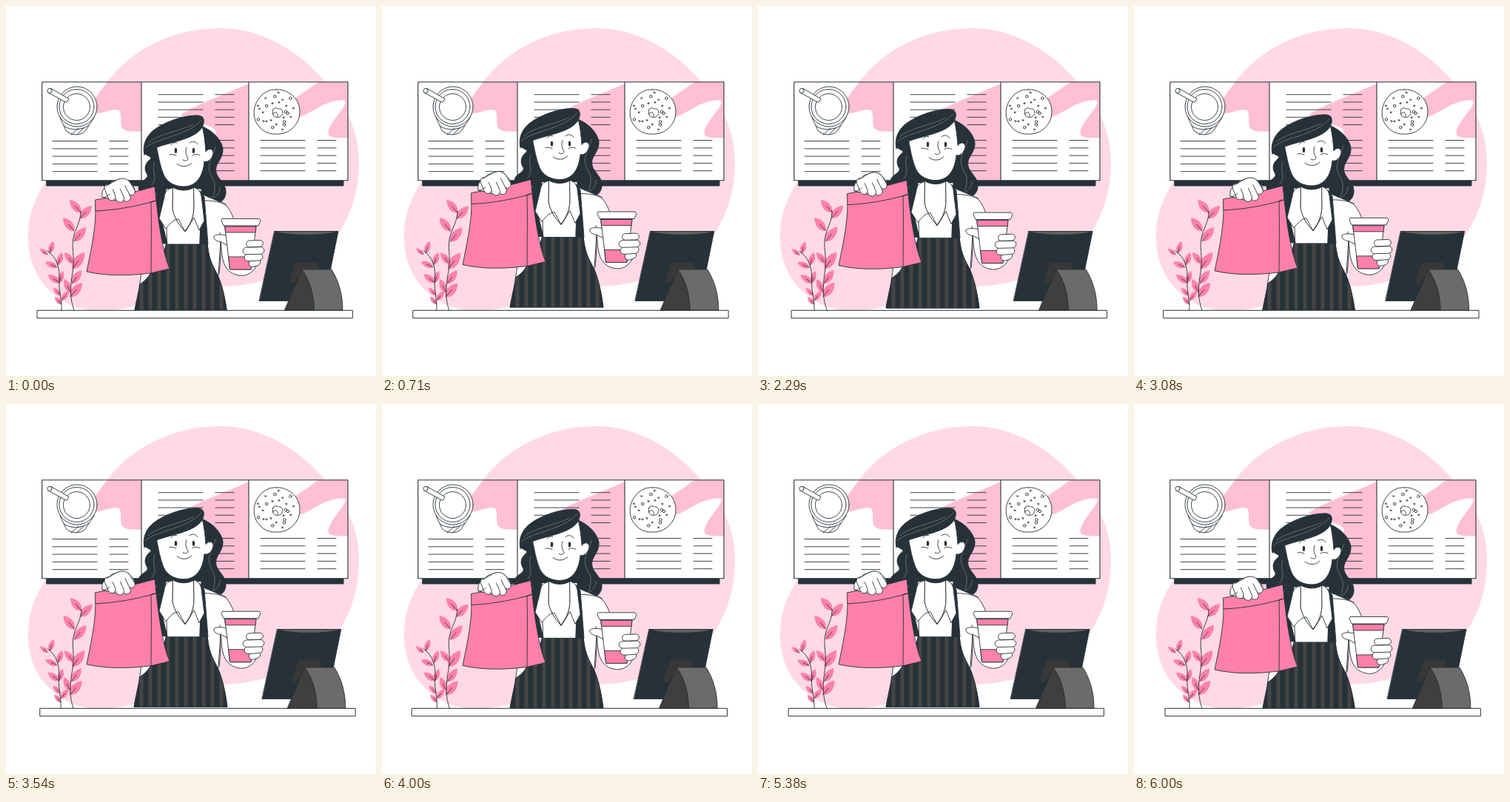
Animation of 500 by 500 pixels, one loop 6040 ms. Source, as an HTML page with a canvas:

```html
<!DOCTYPE html>
<html lang="en">
<head>
<meta charset="utf-8">
<title>Coffee counter</title>
<style>
html, body { margin: 0; width: 100%; height: 100%; overflow: hidden; background: #fff; }
canvas { display: block; width: 500px; height: 500px; }
</style>
</head>
<body>
<canvas id="stage"></canvas>
<script>
const LOOP = 6040, LEAD = 40;
const INK = '#263238', PINK = '#ff80ab', MID = '#ffbfd5', PALE = '#ffd9e6', WHITE = '#fff';
const canvas = document.getElementById('stage');
const ctx = canvas.getContext('2d');
const dpr = window.devicePixelRatio || 1;
canvas.width = canvas.height = 500 * dpr;

function shape(d, fill, stroke = INK, width = 0.9) {
  const p = new Path2D(d);
  if (fill) { ctx.fillStyle = fill; ctx.fill(p); }
  if (stroke) { ctx.strokeStyle = stroke; ctx.lineWidth = width; ctx.stroke(p); }
}
const line = (d, color = INK, width = 0.9) => shape(d, null, color, width);

function oval(x, y, rx, ry = rx, fill = WHITE, stroke = INK) {
  ctx.beginPath();
  ctx.ellipse(x, y, rx, ry, 0, 0, Math.PI * 2);
  if (fill) { ctx.fillStyle = fill; ctx.fill(); }
  if (stroke) { ctx.strokeStyle = stroke; ctx.lineWidth = 0.9; ctx.stroke(); }
}

// Rounded finger between two points
function finger(x1, y1, x2, y2, w) {
  const a = Math.atan2(y2 - y1, x2 - x1), r = w / 2;
  ctx.beginPath();
  ctx.arc(x1, y1, r, a + Math.PI / 2, a - Math.PI / 2);
  ctx.arc(x2, y2, r, a - Math.PI / 2, a + Math.PI / 2);
  ctx.closePath();
  ctx.fillStyle = WHITE; ctx.fill();
  ctx.strokeStyle = INK; ctx.lineWidth = 0.9; ctx.stroke();
}

function rows(x, y, w, n, step) {
  for (let i = 0; i < n; i++) line(`M${x} ${y + i * step}h${w}`);
}

// Pointed leaf from its base to its tip
function leaf(x, y, tx, ty) {
  const dx = tx - x, dy = ty - y, k = 0.3;
  const at = (f, s) => `${x + dx * f - s * dy * k} ${y + dy * f + s * dx * k}`;
  shape(`M${x} ${y}C${at(.2, 1)} ${at(.65, 1)} ${tx} ${ty}C${at(.65, -1)} ${at(.2, -1)} ${x} ${y}Z`, PINK, null);
  line(`M${x} ${y}L${x + dx * .5} ${y + dy * .5}`, INK, 0.8);
}

function backdrop() {
  shape('M290 30C345 30 395 60 432 103C462 138 477 170 477 212C477 255 462 300 432 328C405 354 360 372 312 378C260 380 225 388 185 401C160 412 120 416 92 406C50 388 28 352 30 308C30 275 45 250 65 218C100 165 112 130 140 98C175 55 230 30 290 30Z', PALE, null);
}

function board() {
  shape('M55 236H456V243H55Z', INK);
  shape('M48.7 102.8H462V235.8H48.7Z', WHITE, null);
  shape('M183 103H137C129 112 122 122 118 130V146C131 145 142 139 151 140C159 144 152 159 158 166C164 171 174 169 183 170Z', MID, null);
  shape('M328 105C290 122 260 132 236 147C255 160 283 160 284 171C283 180 270 180 265 195C262 215 280 236 290 236H328Z', MID, null);
  shape('M422 103L386 128L397 150C413 144 421 136 438 130C449 127 457 126 459 129C459 136 446 148 438 163C434 171 435 176 440 177C447 179 455 178 462 178V103Z', MID, null);
  line('M48.7 102.8H462V235.8H48.7Z M183 103V236M328 103V236', INK, 1.1);

  rows(63, 182.5, 60, 5, 10.3);
  rows(140, 182.5, 25, 5, 10.3);
  rows(206, 119.7, 60, 5, 10.2);
  rows(283, 119.7, 25, 5, 10.2);
  rows(283, 181.5, 25, 5, 10.3);
  rows(344, 181.5, 60, 5, 10.3);
  rows(421, 181.5, 25, 5, 10.3);

  // Iced drink
  shape('M73 151L81 168C86 175 101 176 107 169L119 151Z', WHITE);
  line('M78 162C88 169 103 168 112 161M88 174L98 165M96 174L106 164');
  oval(96, 136, 27);
  oval(95.5, 136, 23.5);
  oval(95.5, 136.5, 18);
  shape('M61 111.5L85 125.5L82 130.5L57 117Z', WHITE);
  oval(59, 114.5, 3.1);

  // Donut
  shape('M366 113C375 112 386 118 392 126C399 136 398 150 393 158C387 168 376 174 365 173C354 174 343 167 338 157C333 147 335 134 341 126C347 117 356 112 366 113Z', WHITE);
  shape('M361 140C364 135 368 140 371 139C376 142 374 149 369 150C364 152 358 148 361 140Z', WHITE);
  line('M361 146C364 141 368 144 367 149');
  for (let i = 0; i < 26; i++) {
    const r = 12 + (i * 7 % 16), a = i * 2.4;
    oval(366 + r * Math.cos(a), 143 + r * Math.sin(a), i % 3 ? 1 : 1.8);
  }
}

function plants() {
  [[101, 279, 86, 262], [100, 287, 116, 270], [92, 304, 77, 286], [92, 318, 108, 299],
   [91, 348, 79, 333], [90, 355, 106, 333], [89, 375, 102, 357],
   [87, 387, 79, 369], [87, 393, 103, 374],
   [56, 336, 46, 328], [59, 334, 64, 318], [69, 353, 53, 346], [70, 350, 76, 333],
   [72, 374, 57, 363], [72, 374, 77, 358], [74, 391, 64, 381], [75, 398, 85, 385],
   [75, 403, 66, 393]].forEach(l => leaf(...l));
  line('M92 411C87 397 86 382 90 360C94 338 87 325 92 309C96 296 101 290 101 277');
  line('M75 412C76 397 71 386 72 370C73 354 69 340 56 331');
}

function person() {
  // Hair behind the shoulders
  shape('M187 199C192 204 198 203 195 207C186 214 187 222 191 228C193 235 179 236 179 246C180 255 194 263 210 263L280 267C296 268 301 252 294 241C289 233 282 228 284 218C286 210 294 204 293 192C290 180 281 170 266 163L215 170Z', INK);
  line('M283 190C279 207 269 214 278 231C285 241 282 253 279 259M201 211C196 224 206 231 197 242M289 245C290 252 284 258 279 261', '#7b8589', 0.7);

  // Body
  shape('M207 248C190 260 187 300 183 360L180 380L285 390L290 320L297 268L266 255Z', WHITE);
  // Arm with cup
  shape('M269 263C280 263 293 265 298 270C306 280 309 290 312 306L338 352C333 361 324 366 314 364C299 361 292 350 291 327L289 306', WHITE);
  line('M290 310C290 330 290 345 288 362');

  // Apron
  const apron = 'M217 321H272C274 339 277 347 283 358C292 374 296 395 299 416.5H173C176 400 179 388 181 376C189 371 195 364 197 357L211 340Z';
  shape(apron, INK);
  ctx.save();
  ctx.clip(new Path2D(apron));
  ctx.fillStyle = '#454545';
  for (let x = 180.5; x < 302; x += 12) ctx.fillRect(x, 321, 5, 98);
  ctx.restore();
  line(apron);

  // Shirt, straps and collar
  shape('M216 247H264L262 322H218Z', WHITE);
  shape('M204 247H216L209 284L218 321H212L201 270Z', INK);
  shape('M262 250L268 258L273 322H262L263 290Z', INK);
  shape('M225 238V275C227 287 235 297 242 304C248 297 253 287 254 275V238Z', WHITE);
  shape('M225 246C218 247 215 251 214 258L207 287L216 301C222 293 228 288 233 288L242 305C234 296 227 286 225 274Z', WHITE);
  shape('M254 245C260 247 263 251 264 257L268 290L261 303L254 286L242 305C249 296 253 287 254 274Z', WHITE);

  // Head
  shape('M212 218C212 240 227 249 240 249C255 249 270 238 271 211Z', INK);
  shape('M203 188C206 202 208 216 213 228C218 239 229 244 240 244C256 244 266 232 268 210C274 212 279 205 280 199C280 192 273 192 270 197C269 181 267 170 265 162L220 174Z', WHITE);
  shape('M187 201C184 189 189 177 198 169C214 156 240 148 256 148C267 147 270 154 265 164C255 181 219 184 202 192C195 195 190 198 187 201Z', INK);
  line('M188 192C200 179 246 176 264 154M192 185C203 174 235 169 253 160', '#7b8589', 0.7);
  oval(229.5, 195.5, 1.7, 3.6, INK, null);
  oval(253.5, 195.5, 1.7, 3.6, INK, null);
  line('M223 188C225 185 228 184 231 185M248 185C252 182 257 183 259 187M244 191C242 197 243 201 246 206C246 209 242 210 239 208');
  line('M231 213C236 218 246 218 251 212M221 201C224 200 227 201 230 202M252 202C256 200 259 200 262 202');

  // Bag
  shape('M121 277C121 303 114 335 109 359C139 366 170 364 196 361L221 355C211 331 206 290 203 263L196 265Z', PINK);
  shape('M121 262C147 258 176 251 201 244L203 263C176 271 148 276 121 277Z', PINK);
  line('M196 265C197 298 196 330 196 361M200 263L196 265');

  // Hand on the bag
  shape('M130 258C128 248 135 243 144 238C153 232 161 232 167 238C173 243 176 250 173 252L150 263Z', WHITE);
  finger(163, 240, 169.5, 251, 9.5);
  finger(154, 241, 163, 259, 10.5);
  finger(146, 242, 154, 260, 11);
  finger(138, 246, 143, 258, 10);
  shape('M148 236C155 232 162 232 166 237L156 247L140 248L136 243Z', WHITE, null);
  line('M136 243L148 236C155 232 162 232 166 237M130 258C132 260 136 258 140 254');

  // Cup and hand
  shape('M300 310C292 309 285 308 281 311C280 315 284 318 291 319L302 325Z', WHITE);
  shape('M296 297H338L331 356H303Z', WHITE);
  shape('M296 298H338L337 306H297Z', PINK);
  shape('M301 339H333L331 356H303Z', PINK);
  shape('M292.5 287.5H342L344 290L341 297H294L291 290Z', WHITE);
  finger(333, 348, 339, 346, 9.5);
  finger(327, 340, 342, 339, 9.8);
  finger(325, 331, 344, 330.5, 9.6);
  finger(329, 321.5, 343, 321, 8.8);
}

function counter() {
  shape('M42.4 411.3H468.4V421.8H42.4Z', WHITE, INK, 1);
  shape('M363 304.5H449L430 398.5H342.5Z', INK);
  shape('M363 304.5H449C430 311 382 311 363 304.5Z', '#616161');
  shape('M391 346H421L424 357H402L388 377L382 374Z', '#383838');
  shape('M376.5 411L400 356C411 371 416 390 416.5 411Z', '#3f3f3f');
  shape('M400 356H440C450 372 455 390 455 411H416.5C416 390 411 371 400 356Z', '#6b6b6b');
}

// Piecewise linear value through [phase, value] stops
function track(stops, p) {
  let i = 1;
  while (i < stops.length - 1 && p > stops[i][0]) i++;
  const [a, u] = stops[i - 1], [b, v] = stops[i];
  return u + (v - u) * (p - a) / (b - a);
}
const SHAKE = [0, -1, 2, -4, 4, -4, 4, -4, 2, -1, 0].map((v, i) => [i / 10, v]);
const WIND = [[0, 0], [.25, 1], [.75, -1], [1, 0]];
const FLOAT = [[0, 0], [.5, -10], [1, 0]];
const phase = (t, period) => (t % period) / period;

function moved(dx, dy, paint) {
  ctx.save();
  ctx.translate(dx, dy);
  paint();
  ctx.restore();
}

function draw(ms) {
  const t = ms % LOOP + LEAD;
  ctx.setTransform(dpr, 0, 0, dpr, 0, 0);
  ctx.lineJoin = ctx.lineCap = 'round';
  ctx.fillStyle = WHITE;
  ctx.fillRect(0, 0, 500, 500);
  backdrop();
  board();

  ctx.save();
  ctx.translate(81, 337);
  ctx.rotate(track(WIND, phase(t, 3000)) * Math.PI / 180);
  ctx.translate(-81, -337);
  plants();
  ctx.restore();

  moved(0, 0.5 + track(FLOAT, phase(t, 1500)), person);
  moved(track(SHAKE, phase(t, 6000)), 0, counter);
}

const start = performance.now();
function tick() {
  draw(performance.now() - start);
  requestAnimationFrame(tick);
}
tick();
</script>
</body>
</html>
```
